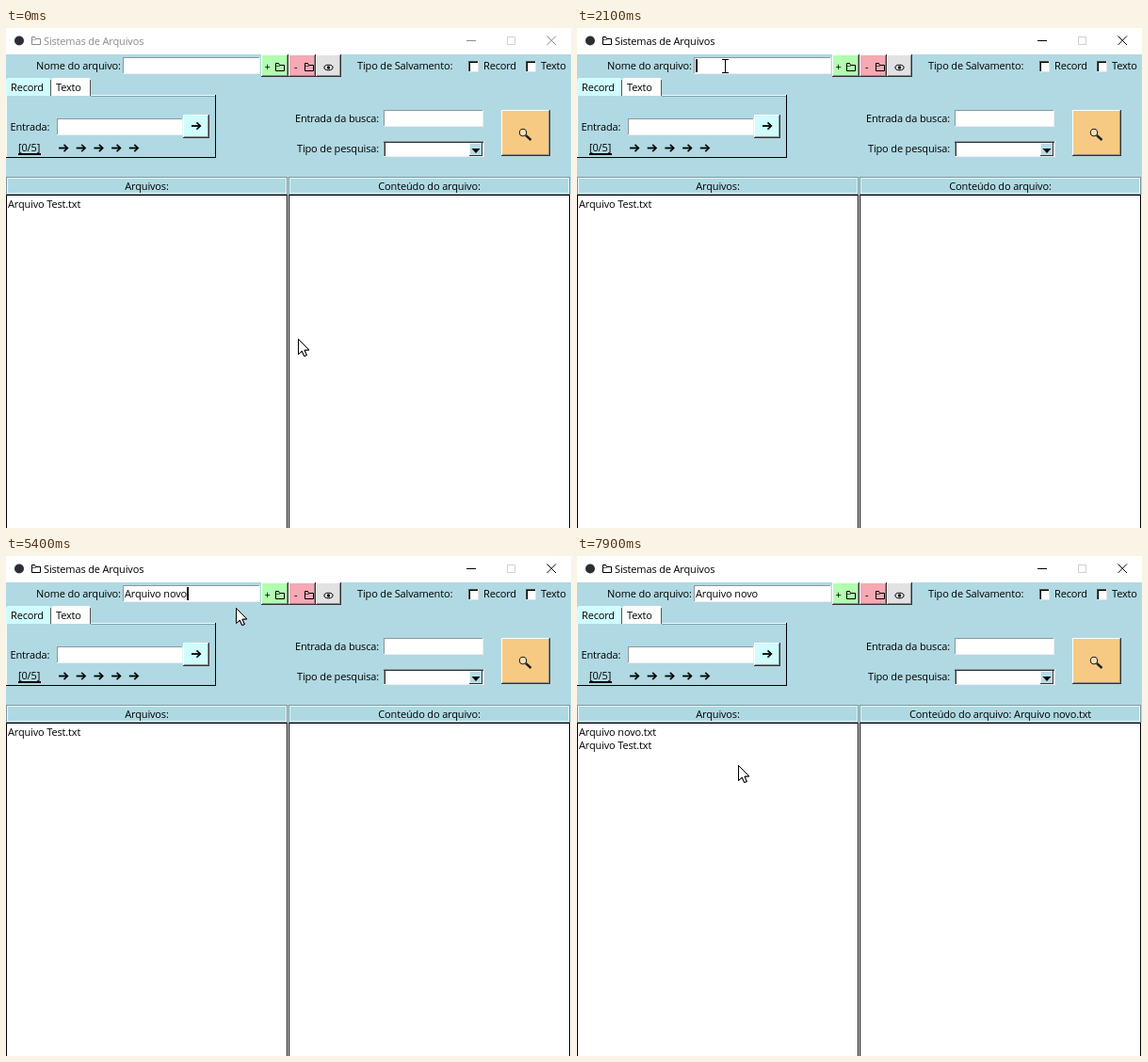
Recreate the animation shown at these times as an HTML page with a canvas. Size 600 by 531 pixels, loop 8000 ms.

```html
<!DOCTYPE html>
<html lang="pt">
<head>
<meta charset="utf-8">
<title>Sistemas de Arquivos</title>
<style>
html, body { margin: 0; width: 100%; height: 100%; overflow: hidden; background: #b0d9e3; }
canvas { display: block; width: 600px; height: 531px; }
</style>
</head>
<body>
<canvas id="stage" width="600" height="531"></canvas>
<script>
const ctx = document.getElementById('stage').getContext('2d');
const LOOP = 8000, STEP = 100;
const BG = '#b0d9e3', CYAN = '#cffdfd', INK = '#000';
const NAME = 'Arquivo novo';
const KEYS = [2800, 2950, 3100, 3200, 3350, 3450, 3600, 3800, 4050, 4200, 4350, 4500];
const FOCUS = 900, CREATE = 5900;
const BLINK = 900, BLINK_ON = 600;
const ENTRIES = [[124, 31, 146, 18], [54, 96, 134, 18], [401, 87, 106, 18]];

// Pointer stops: time, x, y
const PATH = [
  [100, 310, 330], [800, 158, 40], [4700, 158, 40], [5400, 244, 55], [5800, 284, 40],
  [6000, 284, 40], [6550, 135, 207], [6800, 127, 201], [7500, 127, 201], [7900, 171, 222]
];

function box(x, y, w, h, color) {
  ctx.fillStyle = color;
  ctx.fillRect(x, y, w, h);
}

function edges(x, y, w, h, light, dark) {
  box(x, y, w, 1, light);
  box(x, y, 1, h, light);
  box(x, y + h - 1, w, 1, dark);
  box(x + w - 1, y, 1, h, dark);
}

function stroke(points, color = INK, width = 1, close = false) {
  ctx.beginPath();
  points.forEach(([x, y]) => ctx.lineTo(x, y));
  if (close) ctx.closePath();
  ctx.strokeStyle = color;
  ctx.lineWidth = width;
  ctx.stroke();
}

function label(str, x, mid, color = INK, align = 'left') {
  ctx.fillStyle = color;
  ctx.textAlign = align;
  ctx.fillText(str, x, mid + 4);
}

function setFont() {
  ctx.font = '11px "Open Sans", "Noto Sans", sans-serif';
  ctx.letterSpacing = '-0.15px';
  ctx.textBaseline = 'alphabetic';
}

function entry(x, y, w, h) {
  box(x, y, w, h, '#fff');
  edges(x, y, w, h, '#8c989b', '#e8eef0');
}

function button(x, y, w, h, color) {
  box(x, y, w, h, color);
  edges(x, y, w, h, '#fff', '#333');
  box(x + 1, y + h - 2, w - 2, 1, '#8a8a8a');
  box(x + w - 2, y + 1, 1, h - 2, '#8a8a8a');
}

function folder(x, y, color = INK) {
  stroke([[x, y + 8], [x, y], [x + 3, y], [x + 4, y + 2], [x + 9, y + 2], [x + 9, y + 8]], color, 1, true);
  stroke([[x, y + 3], [x + 4, y + 3], [x + 5, y + 2]], color, 0.6);
}

function arrow(x, y) {
  stroke([[x, y], [x + 9, y]], INK, 1.8);
  stroke([[x + 5.5, y - 3.6], [x + 9.3, y], [x + 5.5, y + 3.6]], INK, 1.7);
}

function checkbox(x, y) {
  box(x, y, 11, 12, '#fff');
  edges(x, y, 11, 12, '#555', '#e3e3e3');
  box(x + 1, y + 1, 9, 1, INK);
  box(x + 1, y + 1, 1, 10, INK);
}

function tab(x, w, color, text) {
  ctx.beginPath();
  ctx.roundRect(x, 53, w, 19, [3, 3, 0, 0]);
  ctx.fillStyle = color;
  ctx.fill();
  box(x + w - 1, 55, 1, 17, '#555');
  label(text, x + 5, 63);
}

function titleBar(focused) {
  const ink = focused ? INK : '#8b8b8b';
  box(0, 0, 600, 28, '#fff');
  ctx.beginPath();
  ctx.arc(14, 13.5, 5, 0, 7);
  ctx.fillStyle = '#2b2f33';
  ctx.fill();
  folder(27.5, 9.5, ink);
  label('Sistemas de Arquivos', 40, 14, ink);
  box(489, 13, 10, 1, ink);
  stroke([[532.5, 9.5], [540.5, 9.5], [540.5, 17.5], [532.5, 17.5]], '#d0d0d0', 1, true);
  stroke([[574.5, 8.5], [584, 18]], ink);
  stroke([[584, 8.5], [574.5, 18]], ink);
}

function toolbar() {
  label('Nome do arquivo:', 32, 40);
  button(271, 28, 29, 24, '#b2fdb0');
  label('+', 274.5, 41);
  folder(286.5, 37.5);
  button(300, 28, 29, 24, '#f5a9b3');
  label('-', 306, 41);
  folder(317.5, 37.5);
  button(329, 28, 27, 24, '#e2e2e2');
  ctx.beginPath();
  ctx.ellipse(342.5, 42, 4.6, 2.8, 0, 0, 7);
  ctx.strokeStyle = INK;
  ctx.lineWidth = 1;
  ctx.stroke();
  ctx.beginPath();
  ctx.arc(342.5, 42, 1.7, 0, 7);
  ctx.fillStyle = INK;
  ctx.fill();
  label('Tipo de Salvamento:', 373, 40);
  checkbox(491, 35);
  label('Record', 507, 40);
  checkbox(552, 35);
  label('Texto', 568, 40);
}

function recordPanel() {
  edges(0, 71, 223, 67, '#f4fbfc', INK);
  box(90, 72, 132, 1, '#86a3aa');
  tab(0, 48, CYAN, 'Record');
  tab(48, 42, '#fdfefe', 'Texto');
  label('Entrada:', 4.5, 105);
  button(188, 92, 28, 25, CYAN);
  arrow(197, 104);
  label('[0/5]', 13, 127);
  box(13, 133, 24, 2, INK);
  for (let i = 0; i < 5; i++) arrow(56 + i * 18.7, 127.5);
}

function searchPanel() {
  label('Entrada da busca:', 396, 96, INK, 'right');
  label('Tipo de pesquisa:', 396, 128, INK, 'right');
  entry(401, 120, 107, 17);
  box(401, 121, 106, 1, '#333');
  box(402, 121, 1, 15, '#333');
  box(492, 122, 14, 14, '#b8dce6');
  edges(492, 122, 14, 14, '#e6f4f8', '#333');
  ctx.beginPath();
  ctx.moveTo(494.5, 128);
  ctx.lineTo(503.5, 128);
  ctx.lineTo(499, 133);
  ctx.fillStyle = INK;
  ctx.fill();
  button(526, 87, 52, 49, '#f7ca83');
  ctx.beginPath();
  ctx.arc(549, 111, 3.7, 0, 7);
  ctx.fillStyle = '#f2dfb8';
  ctx.fill();
  ctx.strokeStyle = '#222';
  ctx.lineWidth = 1.1;
  ctx.stroke();
  stroke([[552, 114], [557.5, 119]], '#222', 2.4);
}

function pane(x, title, lines) {
  box(x, 158, 299, 19, '#aed9e3');
  edges(x, 158, 299, 19, '#7d979e', '#7d979e');
  edges(x + 1, 159, 297, 17, '#e6f6fa', '#e6f6fa');
  label(title, x + 149.5, 168, INK, 'center');
  box(x, 177, 300, 354, '#fff');
  box(x, 177, 299, 1, INK);
  box(x, 177, 1, 354, INK);
  box(x + 298, 177, 1, 354, INK);
  lines.forEach((line, i) => label(line, x + 2, 187 + i * 14));
}

function nameField(t) {
  const typed = KEYS.filter(k => k <= t);
  const text = NAME.slice(0, typed.length);
  label(text, 126, 40);
  if (t < FOCUS) return;
  const last = typed.length ? typed[typed.length - 1] : FOCUS;
  if ((t - last) % BLINK < BLINK_ON) {
    ctx.textAlign = 'left';
    box(Math.round(126 + ctx.measureText(text).width), 33, 2, 14, INK);
  }
}

function pointerAt(t) {
  const i = PATH.findIndex(p => p[0] > t);
  if (i === 0) return PATH[0].slice(1);
  if (i < 0) return PATH[PATH.length - 1].slice(1);
  const [t0, x0, y0] = PATH[i - 1], [t1, x1, y1] = PATH[i];
  const u = (t - t0) / (t1 - t0), e = u * u * (3 - 2 * u);
  return [Math.round(x0 + (x1 - x0) * e), Math.round(y0 + (y1 - y0) * e)];
}

function pointer(x, y) {
  const overText = ENTRIES.some(([l, top, w, h]) => x >= l && x < l + w && y >= top && y < top + h);
  if (overText) {
    box(x - 1, y - 7, 1, 15, INK);
    for (const edge of [y - 7, y + 7]) {
      box(x - 4, edge, 3, 1, INK);
      box(x, edge, 3, 1, INK);
    }
    return;
  }
  const shape = [[0, 0], [0, 16], [3.8, 12.6], [6.2, 18], [8.8, 17], [6.4, 11.6], [11.3, 11.4]]
    .map(([dx, dy]) => [x + dx + 0.5, y + dy + 0.5]);
  stroke(shape, INK, 1, true);
  ctx.fillStyle = '#fff';
  ctx.fill();
  ctx.stroke();
}

function draw(t) {
  const created = t >= CREATE;
  setFont();
  box(0, 0, 600, 531, BG);
  titleBar(t >= FOCUS);
  toolbar();
  recordPanel();
  searchPanel();
  ENTRIES.forEach(e => entry(...e));
  nameField(t);
  pane(0, 'Arquivos:', created ? [NAME + '.txt', 'Arquivo Test.txt'] : ['Arquivo Test.txt']);
  pane(300, 'Conteúdo do arquivo:' + (created ? ' ' + NAME + '.txt' : ''), []);
  pointer(...pointerAt(t));
}

const start = performance.now();
function frame() {
  const t = (performance.now() - start) % LOOP;
  draw(Math.floor(t / STEP) * STEP);
  requestAnimationFrame(frame);
}
frame();
</script>
</body>
</html>
```
